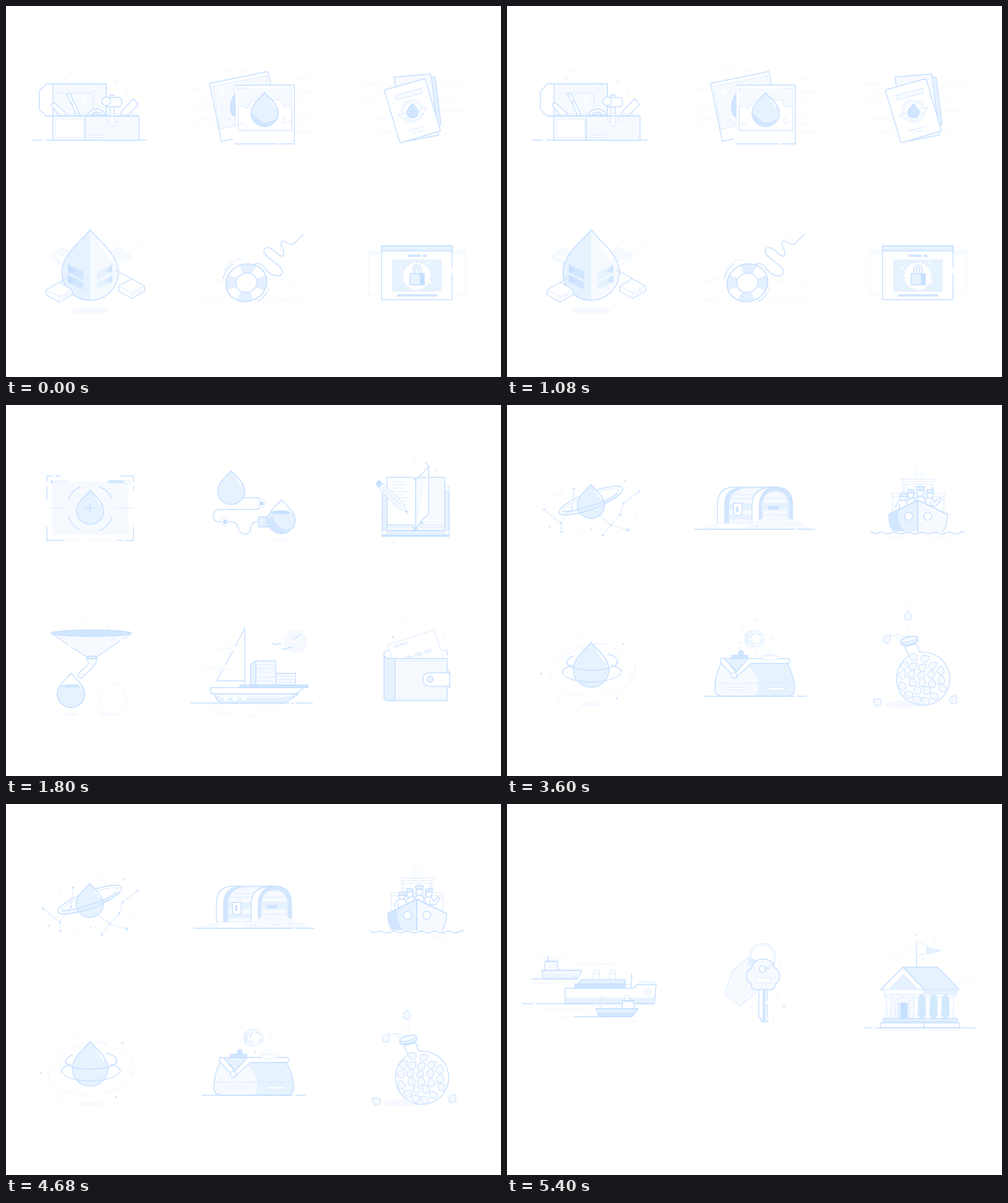
These frames come from a looping animation (800 by 600 pixels, 7.17 s). An HTML page:

```html
<!DOCTYPE html>
<html lang="en">
<head>
<meta charset="utf-8">
<title>Spot illustrations</title>
<style>
html,body{margin:0;width:100%;height:100%;overflow:hidden;background:#fff}
svg{display:block;width:100vw;height:100vh;fill:none;stroke:#c5dfff;stroke-width:1.4;stroke-linejoin:round}
.w{fill:#fff}.p{fill:#f6faff}.m{fill:#e7f2ff}.d{fill:#d2e6ff}.k{fill:#c5dfff}
.n{stroke:none}
.t{stroke:#dcecff;stroke-width:1.1}
.f{stroke:#f0f6ff;stroke-width:1}
.h{stroke:#fff;stroke-width:2;stroke-linecap:round}
.slide{visibility:hidden;animation:7170ms step-end infinite}
#s1{animation-name:a}#s2{animation-name:b}#s3{animation-name:c}#s4{animation-name:e}
@keyframes a{0%{visibility:visible}25.105%,100%{visibility:hidden}}
@keyframes b{0%{visibility:hidden}25.105%{visibility:visible}50.209%,100%{visibility:hidden}}
@keyframes c{0%{visibility:hidden}50.209%{visibility:visible}75.314%,100%{visibility:hidden}}
@keyframes e{0%{visibility:hidden}75.314%,100%{visibility:visible}}
</style>
</head>
<body>
<svg viewBox="0 0 800 600">
<defs>
  <path id="drop" vector-effect="non-scaling-stroke" d="M0 0C6 8 22 19 22 33A22 22 0 0 1-22 33C-22 19-6 8 0 0Z"/>
  <path id="plus" d="M-4 0H4M0-4V4"/>
  <path id="shine" d="M8 12Q14 17 16 23"/>
  <g id="column"><path class="w" d="M-4 312L-3 343H3L4 312Z"/><path class="w" d="M-6 308H6V312H-6ZM-6 343H6V347H-6Z"/></g>
  <clipPath id="left"><path d="M0 0H-30V60H0Z"/></clipPath>
  <clipPath id="low"><path d="M-30 20H30V60H-30Z"/></clipPath>
</defs>

<g class="slide" id="s1">
  <!-- toolbox -->
  <path d="M41 217H58M64 217H228"/>
  <path class="w" d="M65 126H162V178H65L54 167V138Z"/>
  <path class="p" d="M76 126H162V178H76Z"/>
  <path class="t" d="M76 126V178M82 141H141V172M141 141L153 127"/>
  <path class="w" d="M73 160Q76 154 81 159L98 174 93 178H87Z"/>
  <path class="w" d="M98 143Q102 138 105 144L109 154 117 170 120 178H114L106 158 102 151ZM103 157L110 153"/>
  <path class="w" d="M131 177A16 16 0 0 1 161 177Z"/><path class="m" d="M137 177A10 10 0 0 1 155 177Z"/>
  <path class="w" d="M168 144H175V178H168Z"/><path class="w" d="M163 148H183Q187 149 187 155T183 163H163Z"/><circle class="w" cx="162" cy="154" r="7"/>
  <path class="w" d="M185 172L206 150 214 159 196 178H188Z"/>
  <path class="p" d="M76 178H215V217H76Z"/>
  <path class="w" d="M76 178H128V217H76Z"/><path class="t" d="M80 183H126V213H80Z"/>
  <path class="t" d="M135 208H158V213H135ZM76 175H213V178M163 178V188H181V178"/>
  <path class="w t" d="M168 174H175V194H168Z"/><path d="M65 178H215"/>
  <use href="#plus" class="f" x="105" y="106"/><use href="#plus" class="f" x="195" y="139"/><use href="#plus" class="h" x="128" y="151"/>
  <path class="m n" d="M95 116h3v3h-3ZM178 121h3v3h-3Z"/>

  <!-- photos -->
  <path class="f" d="M345 104H368M374 104H396M297 135H322M310 149H328M298 166H331M309 181H336M296 194H318M322 194H340M469 117H494M470 139H504M468 150H488M470 175H496M470 190H490M469 203H503"/>
  <path class="w" d="M366 215L348 219 329 125 423 106 428 128"/>
  <path class="p t" d="M370 194L346 199 334 130 420 113 424 128H370Z"/>
  <path class="d" d="M370 143Q363 152 363 164T370 179Z"/>
  <use href="#plus" class="h" x="350" y="139"/><path class="m n" d="M347 160h3v3h-3ZM359 182h3v3h-3ZM398 121h3v3h-3Z"/>
  <path class="w" d="M370 128H466V223H444M440 223H370Z"/>
  <path class="p n" d="M375 133H462V202H375Z"/>
  <path class="w t" d="M375 201V163Q384 159 390 167Q397 149 408 152 421 140 432 153Q445 147 449 163Q458 160 462 166V201Z"/>
  <path class="t" d="M375 193Q384 187 390 196M451 181Q444 184 450 191 456 185 462 187M375 140V133H390M447 133H462V202H416M411 202H375V169"/>
  <g transform="translate(418 140)"><use href="#drop" class="m"/><path class="d n" d="M-21 33Q-19 53 0 54 13 54 20 41 2 57-15 38Z"/><use href="#shine" class="h"/></g>

  <!-- passports -->
  <path class="f" d="M576 126H607M592 141H611M573 154H607M590 183H621M600 204H628M700 129H743M704 150H728M699 169H742M706 184H728M705 206H718"/>
  <path class="m" d="M680 116L692 115Q694 116 694 118L703 191 690 197Z"/>
  <path class="p" d="M627 115L685 110Q687 110 687 112L699 209 645 219Z"/>
  <path class="w" d="M614 135L675 118Q677 118 678 120L702 202 639 221Q637 221 636 219L612 138Q612 136 614 135Z"/>
  <g transform="translate(657 170) rotate(-15)" class="t">
    <path class="p" d="M-21-32H23V-24H-21ZM-16 29H14M-10 34H7"/>
    <circle r="18"/><circle r="15"/><path class="w" d="M-24 0H-8L-12 8H-17ZM24 0H8L12 8H17Z"/>
  </g>
  <g transform="translate(657 158) scale(.42)"><use href="#drop" class="d"/><use href="#shine" class="h"/></g>

  <!-- storage drop -->
  <path class="p f" d="M72 402L93 390 113 402 93 413ZM72 402V408L93 420 113 408M160 402L181 390 201 402 181 413ZM201 402V408L181 420M171 390L190 379M198 400L224 386"/>
  <ellipse class="p n" cx="136" cy="493" rx="32" ry="6"/>
  <g transform="translate(136 362) scale(2.07)"><use href="#drop" class="p"/><g clip-path="url(#left)"><use href="#drop" class="m"/></g><use href="#shine" class="h"/></g>
  <path class="d n" d="M100 417L125 430V443L100 431ZM100 434L125 447V459L100 447Z"/>
  <path class="k n" d="M100 417L111 430 100 431ZM100 434L111 446 100 447Z"/>
  <path class="m n" d="M172 417L147 430V443L172 431ZM172 434L147 447V459L172 447Z"/>
  <path class="d n" d="M172 417L161 430 172 431ZM172 434L161 446 172 447Z"/>
  <path d="M86 447L99 439M203 441L175 426"/>
  <g id="box"><path class="w" d="M65 459L86 447 107 459V467L86 479 65 467Z"/><path class="t" d="M65 459L86 470 107 459M86 470V479M90 472L103 465"/></g>
  <use href="#box" x="117" y="-6"/>

  <!-- lifebuoy -->
  <path class="f" d="M311 443q5-5 10 0t10 0 10 0 10 0M425 443q5-5 10 0t10 0 10 0 10 0 10 0 10 0M311 475q5-5 10 0t10 0 10 0 10 0M425 476q5-5 10 0t10 0 10 0 10 0 10 0 10 0M452 375L463 366M470 397L482 387"/>
  <g transform="translate(388.500 447.500) rotate(-20) scale(1.04 .94)">
    <circle class="w" r="32"/><circle r="24.500" style="stroke:#e4f0ff;stroke-width:14;stroke-dasharray:19.240"/>
    <path class="t" d="M32 0H16M23 23L11 11M0 32V16M-23 23L-11 11M-32 0H-16M-23-23L-11-11M0-32V-16M23-23L11-11"/>
    <circle r="32"/><circle class="w" r="16.500"/>
  </g>
  <path d="M351 441Q354 426 367 417M421 464Q415 474 406 478"/><path class="t" d="M353 428Q362 411 382 409M425 455Q424 461 421 465"/>
  <path d="M401 418C410 413 416 420 421 427C429 438 446 440 447 430C448 420 419 408 417 398C415 389 425 389 432 395C440 402 448 409 449 401C450 393 441 386 446 381C451 378 457 388 464 385L481 369"/>

  <!-- secure page -->
  <path class="f" d="M586 396H743V468H586Z"/><path class="p n" d="M586 395H607V402H586ZM721 395H743V402H721Z"/>
  <path class="w" d="M721 424V388H607V475H721V432"/><path class="m" d="M607 388H721V396H607Z"/>
  <path class="d n" d="M649 402H670V406H649ZM673 402H680V406H673ZM632 466H697V470H632Z"/>
  <path class="m n" d="M624 410H704V462H624Z"/>
  <circle class="w n" cx="664" cy="437" r="21"/><circle cx="664" cy="437" r="21" style="stroke:#fff;stroke-width:4;stroke-linecap:round;stroke-dasharray:.1 7.230"/>
  <path class="w n" d="M637 422h3v3h-3ZM681 414h3v3h-3ZM683 445h4v4h-4Z"/>
  <path class="w" d="M658 433V425Q658 419 664 419T671 425V433H667V426Q667 423 664 423T662 426V433Z"/>
  <path class="m" d="M653 433H676V451H653Z"/><path class="k n" d="M669 433H676V451H669Z"/>
</g>

<g class="slide" id="s2">
  <!-- viewfinder -->
  <path class="p n" d="M74 123H198V210H74Z"/>
  <path d="M66 125V115H75M80 115H88M66 132V154M66 197V219H95M185 115H206V125M206 132V137M206 197V219H192M189 219H178"/>
  <path class="t" d="M66 167H95M176 167H206"/><path class="m" style="stroke:#e7f2ff;stroke-width:3;stroke-dasharray:1 4" d="M103 218H169"/>
  <circle class="d n" cx="74" cy="124" r="2.500"/><g class="w t"><circle cx="81" cy="124" r="2"/><circle cx="89" cy="124" r="2.500"/><circle cx="97" cy="124" r="2.500"/></g>
  <path class="w t" d="M166 122H200V126H166Z"/><path class="d n" d="M166 122H190V126H166Z"/>
  <path d="M101 152Q107 137 121 132M151 132Q166 138 172 152M172 181Q166 197 151 203M121 203Q107 197 101 181"/>
  <g transform="translate(136 138)"><use href="#drop" class="m"/><use href="#shine" class="h"/></g><path d="M128 167H144M136 159V175"/>

  <!-- transfer -->
  <path d="M383 150H404Q413 150 413 159T404 169H345Q335 169 335 179T345 189H364C374 189 374 197 376 202C380 211 393 211 395 202C397 194 396 189 407 189"/>
  <path class="f" d="M356 177H372"/>
  <g class="w t"><circle cx="413" cy="159" r="6.500"/><circle cx="354" cy="189" r="6.500"/></g><circle class="k n" cx="413" cy="159" r="3.500"/><circle class="k n" cx="354" cy="189" r="3.500"/>
  <g transform="translate(364 106)"><use href="#drop" class="m"/><use href="#shine" class="h"/></g>
  <path class="m" d="M408 181H427V197H408ZM420 181V197M425 181V197"/>
  <g transform="translate(445 153)"><use href="#drop" class="w"/><g clip-path="url(#low)"><use href="#drop" class="m"/></g><ellipse class="k n" cy="20.500" rx="17" ry="3"/><path class="d n" d="M-22 33Q-18 55 0 55 12 54 18 46-6 55-14 24Z"/><use href="#shine" class="h"/></g>
  <ellipse class="p n" cx="444" cy="219" rx="13" ry="3"/>

  <!-- notebook -->
  <path class="m" d="M608 132H716V212H608Z"/><path class="w t" d="M608 203H616V209H608ZM709 203H716V209H709ZM709 132H716V138H709Z"/>
  <path class="p" d="M662 117H709V203H616V194H662Z"/><path class="w" d="M616 117H655Q662 117 662 124V202Q659 194 654 194H616Z"/>
  <path class="t" d="M616 198H654Q660 198 662 203 665 194 673 194H709M668 198H709"/>
  <path class="t" d="M623 124H646M625 129H650M624 134H641M624 140H650M623 145H645M630 150H650M636 156H648M640 161H651"/>
  <path class="w" d="M662 121L682 101Q684 97 677 92M683 98V172Q683 180 677 181L662 199"/>
  <path class="k n" d="M657 203L662 197 667 203ZM608 210H717V213H608ZM668 192L671 187 675 192Z"/>
  <path class="m n" d="M608 136L650 174 646 166 637 168 608 142Z"/>
  <path class="p t" d="M608 126L641 157 650 174 633 166 601 133Z"/><path class="t" d="M604 130L637 161"/><path class="k n" d="M597 127L603 121 609 127 602 134ZM646 170L651 175 645 173Z"/>
  <g class="f"><use href="#plus" x="662" y="87"/><use href="#plus" x="598" y="183"/><use href="#plus" x="728" y="186"/></g><path class="d n" d="M694 105h2v2h-2ZM625 221h2v2h-2Z"/>

  <!-- funnel -->
  <path class="p n" d="M73 369H203L147 407H130Z"/><path d="M73 369L101 388M105 391L130 407M203 369L190 378M185 381L147 407"/><ellipse class="d" cx="138" cy="369" rx="65" ry="5"/>
  <path class="w" d="M130 408Q135 418 132 421L116 435Q116 441 122 442L141 423Q147 417 147 408Z"/><ellipse class="m" cx="138.500" cy="408.500" rx="8" ry="2.500"/><path class="t" d="M119 433L125 439M135 417L141 422"/>
  <g transform="translate(105 434)"><use href="#drop" class="w"/><g clip-path="url(#low)"><use href="#drop" class="m"/></g><ellipse class="d n" cy="20.500" rx="17" ry="3"/><use href="#shine" class="h"/></g>
  <g transform="translate(180 447) rotate(12)"><use href="#drop" class="f w"/></g>
  <ellipse class="p n" cx="104" cy="500" rx="14" ry="3"/><ellipse class="p n" cx="164" cy="500" rx="14" ry="3"/>
  <path class="d n" d="M110 356h2v2h-2ZM163 358h2v2h-2ZM97 378h2v2h-2ZM132 384h2v2h-2ZM154 389h2v2h-2ZM172 378h2v2h-2ZM114 372h2v2h-2ZM147 368h2v2h-2ZM87 465h2v2h-2ZM97 474h2v2h-2ZM108 464h2v2h-2ZM119 469h2v2h-2Z"/>
  <use href="#plus" class="f" x="124" y="347"/>

  <!-- cargo sailboat -->
  <circle class="p n" cx="468" cy="382" r="19.500"/><path d="M429 386q4-1 7 2 4-3 9-1M445 395q4-2 8 0 4-4 10-3M464 380q2-4 5-3 3-5 8-5"/>
  <path class="f" d="M349 389H378M336 394H370M324 424H355M312 428H368M320 490H350M398 490H448M330 497H366M385 503H405"/>
  <path d="M386 361L370 391M367 397L354 421M351 427L341 446H386M386 361V453"/>
  <path class="m" d="M395 419L404 414V453H395Z"/><path class="p" d="M404 414H436V453H404ZM436 434H468V453H436Z"/><path class="t" d="M395 430L404 426H436M395 442L404 440H436M436 444H468M407 420H432M407 432H432M407 446H432M440 439H464M440 449H464"/>
  <path class="m" d="M336 467H473L456 479Q451 482 444 482H350Q342 482 336 467Z"/><path class="w" d="M331 457H482L468 467H331Z"/><path class="p n" d="M340 468H466L445 473H344Z"/>
  <path class="d" d="M378 453H488V457H378Z"/><circle class="w n" cx="355" cy="475" r="3.500"/><circle class="w n" cx="370" cy="475" r="3.500"/><circle class="w n" cx="385" cy="475" r="3.500"/>
  <path d="M298 482H458M461 482H465M468 482H496"/>

  <!-- wallet -->
  <path class="w" d="M620 410H616Q611 409 611 403T617 397H621M707 397H713V405"/>
  <g transform="translate(617 388) rotate(-18)"><rect class="w t" width="79" height="50" rx="3"/><path class="m n" d="M7 4H32V8H7ZM19 27H31V33H19ZM36 27H48V33H36ZM53 27H65V33H53Z"/></g>
  <path class="p" d="M611 404Q612 410 618 410H713V478H617Q611 478 611 472Z"/><path class="m" d="M611 404Q612 410 618 410H629V478H617Q611 478 611 472Z"/><path class="t" d="M633 414H710M633 474H710"/>
  <path class="d n" d="M712 428L718 432V458L712 455Z"/><path class="w" d="M717 433V455H686Q674 455 674 444T686 433Z"/><circle class="m" cx="685.500" cy="443.500" r="5"/>
  <g class="f"><use href="#plus" x="645" y="349"/><use href="#plus" x="708" y="375"/></g><path class="d n" d="M624 374h3v3h-3ZM679 353h2v2h-2Z"/>
</g>

<g class="slide" id="s3">
  <!-- constellation -->
  <path class="t" d="M60 169L87 191 105 166 108 135M87 191L88 205M148 178L168 194 195 202M168 194L155 211M168 194L183 177 188 159 213 140"/>
  <path class="f" d="M73 147L89 145V132M112 193L119 202 108 213M149 112L157 124"/>
  <g transform="translate(135.500 154.500) rotate(-21)"><ellipse class="t" rx="48" ry="9"/><ellipse rx="55" ry="13"/></g>
  <g transform="translate(135.500 128.500)"><use href="#drop" class="m"/><use href="#shine" class="h"/></g>
  <path d="M84 175Q87 181 120 174 157 165 184 143M90 172Q104 173 136 163 164 155 179 143"/>
  <g class="d n"><circle cx="60" cy="169" r="2"/><circle cx="87" cy="191" r="2"/><circle cx="105" cy="166" r="2"/><circle cx="108" cy="135" r="2"/><circle cx="88" cy="205" r="2"/><circle cx="168" cy="194" r="2"/><circle cx="195" cy="202" r="2.500"/><circle cx="155" cy="211" r="2"/><circle cx="183" cy="177" r="2"/><circle cx="188" cy="159" r="2"/><circle cx="213" cy="140" r="2"/><circle cx="69" cy="197" r="1.500"/><circle cx="137" cy="200" r="1.500"/><circle cx="191" cy="122" r="1.500"/></g>
  <g class="f"><use href="#plus" x="120" y="108"/><use href="#plus" x="208" y="177"/></g>

  <!-- chest -->
  <path class="w" d="M340 201V160Q341 133 366 133H437Q461 135 461 160V201Z"/>
  <path class="p n" d="M360 150Q366 136 378 136H414Q398 141 396 158V191H360Z"/>
  <path class="d n" d="M351 191V160Q352 137 371 134H386Q361 138 359 160V191Z"/>
  <path class="t" d="M378 135H417M367 145H402M361 151H398M359 160H396M359 169H396M359 178H396M359 184H396"/><path class="m n" d="M359 161H396V168H359ZM359 179H396V184H359Z"/>
  <path class="m" d="M408 185V160Q409 133 434 133 461 134 461 161V187H408Z"/><path class="d n" d="M408 185V160Q410 136 434 133 458 135 461 160V187H456V161Q455 140 434 138 414 140 412 160V185Z"/>
  <path class="p t" d="M413 159Q415 140 434 140T454 159V183H413Z"/><path class="t" d="M415 151H453M413 159H454M413 170H454M413 178H454"/><path class="m n" d="M413 160H454V169H413Z"/><path class="d" d="M423 164H438V168H423Z"/>
  <path class="w" d="M396 191V160Q397 133 431 133 410 137 408 160V191Z"/>
  <path class="w t" d="M340 191H397V201H340Z"/><path class="w" d="M366 159H380V173Q380 179 373 179T366 173Z"/><circle class="k n" cx="372" cy="166" r="2"/><path class="k n" d="M371 166H373L374 173H370Z"/>
  <path class="p n" d="M313 200Q328 192 342 191V201ZM377 201Q389 190 406 187 430 171 459 185 481 191 494 201Z"/>
  <path class="d n" d="M402 195h3v2h-3ZM424 185h2v2h-2ZM438 194h2v2h-2ZM458 193h2v2h-2Z"/>
  <path d="M303 201H465M469 201H498"/>

  <!-- crew -->
  <path class="f" d="M660 120V108H671V120M654 111H676M660 108V99"/>
  <path class="w t" d="M637 120H691V124H637ZM640 124H688V150H640ZM643 128H685V146H643ZM622 143H707V148H622ZM623 148V175M706 148V172"/>
  <path class="w" d="M628 167Q629 155 637 154H645L651 170M634 160V170M645 159Q648 150 658 150L663 160M658 160Q660 148 668 147 675 148 678 160M674 158Q677 149 684 150 690 152 691 158L698 150 702 152 694 163H686M685 155V166"/>
  <g class="w"><path d="M635 147V151Q637 155 641 154 645 154 646 148ZM648 142V147Q649 151 653 151 657 150 658 142ZM663 138V144Q665 148 668 148 673 147 674 138ZM679 142V147Q681 151 684 151 688 150 689 142Z"/></g>
  <path class="m" d="M635 148Q635 142 641 142T647 148ZM648 142V136L658 138V142ZM661 133L668 131 675 133 673 138H663ZM678 138L689 136V142H678Z"/>
  <path class="m" d="M664 154L617 177Q617 199 627 206H664Z"/><path class="d n" d="M617 177L632 170Q630 195 645 206H627Q617 199 617 177Z"/><path class="p" d="M664 154L712 177Q712 199 702 206H664Z"/><path d="M664 154V206M617 177L664 154 712 177"/>
  <circle class="w" cx="649" cy="180" r="6.500"/><circle class="w" cx="680" cy="180" r="6.500"/>
  <path class="w" d="M588 204q5 6 11 3t11 0 11 0 11 0 11 0 11 0 11 0 11 0 11 0 11 0 11 0 11 0 11 0 9-2"/>
  <path class="f" d="M616 214q6 4 12 0t12 0M680 216q6 4 12 0t12 0 12 0"/>

  <!-- orbit drop -->
  <path class="f" d="M132 470Q69 469 69 437T139 390M157 391Q207 397 207 428 206 459 154 469M86 401Q104 390 130 389"/>
  <path class="t" d="M140 386Q160 385 164 388"/>
  <path d="M108 405Q97 410 96 417M163 403Q183 408 177 419M89 433Q91 424 106 421M168 421Q184 424 185 432"/>
  <g transform="translate(136 384) scale(1.320)"><use href="#drop" class="m"/><use href="#shine" class="h"/></g>
  <path d="M96 416Q99 428 137 429 175 428 180 415M94 438Q104 447 138 448 177 446 184 433M90 433L92 436"/>
  <ellipse class="p n" cx="137" cy="485" rx="18" ry="3.500"/><g class="f"><use href="#plus" x="116" y="375"/><use href="#plus" x="84" y="475"/><use href="#plus" x="201" y="435"/></g><path class="d n" d="M187 385h3v3h-3ZM54 433h3v3h-3ZM176 473h3v3h-3Z"/>

  <!-- purse -->
  <path class="m" d="M346 417Q336 439 336 458 336 471 350 471H452Q465 471 465 458 465 441 453 417Z"/><path class="p n" d="M347 417Q337 439 337 458 337 470 350 470H400Q408 464 406 450 404 433 386 418Z"/>
  <path class="t" d="M337 450H464"/><path class="w t" d="M358 457H384V461H358ZM423 457H449V461H423Z"/>
  <path class="m n" d="M353 411H387L370 434Z"/><path class="d n" d="M361 421H379L370 434Z"/>
  <path class="w" d="M349 410H453Q457 410 457 414T453 418H395L374 437Q371 443 366 439L345 416V410ZM352 411L370 432 389 411"/><path class="m n" d="M358 413H383L371 430Z"/>
  <circle class="w" cx="367" cy="437" r="4.500"/>
  <path class="d" d="M363 405H389V410H363Z"/><circle class="d" cx="378" cy="401" r="4"/><path class="w t" d="M412 405H438V412H412Z"/><circle class="w t" cx="423" cy="401" r="4"/>
  <path class="p t" d="M403 365H393Q384 368 384 378T393 391H403"/><circle class="w t" cx="403" cy="378" r="13"/><circle class="t" cx="403" cy="378" r="9" style="stroke-dasharray:11 3;stroke-width:2"/><path class="t" d="M388 370V386M385 374H390M385 382H390"/>
  <g class="f"><use href="#plus" x="381" y="359"/><use href="#plus" x="429" y="378"/></g><path class="d n" d="M403 346h2v2h-2ZM377 383h2v2h-2ZM402 400h2v2h-2Z"/>
  <path d="M317 471H464M468 471H484"/>

  <!-- flask -->
  <ellipse class="p n" cx="640" cy="484" rx="31" ry="6"/>
  <path class="f" d="M645 333V322M652 333V322M646 370V355M651 370V352"/><path class="t" d="M623 374Q638 367 642 379M629 377Q636 374 639 382"/>
  <path class="w" d="M643 391L650 406A43 43 0 1 0 667 400L662 386Z"/>
  <g id="seeds"></g>
  <g transform="translate(650.500 383) rotate(-14)"><path class="w" d="M-14-4Q0-9 14-4V2Q0 8-14 2Z"/><ellipse class="p" cy="-4" rx="14" ry="4"/><path class="d n" d="M-14 0Q0 5 14 0V2Q0 8-14 2Z"/></g>
</g>

<g class="slide" id="s4">
  <!-- ships -->
  <path class="f" d="M40 249H95Q98 247 102 251 110 250 109 257H130Q137 254 142 262M145 264Q153 255 162 260M174 264Q178 258 169 259H112M40 290H80M56 333H134M88 344H106M165 352H211"/>
  <path class="w" d="M62 255H81L83 269H60Z"/><path d="M61 254H83M66 245V254"/><path class="t" d="M68 260H80V264H68Z"/>
  <path class="p" d="M57 269H121L114 283H57Z"/><path class="t" d="M57 276H104"/><path class="m n" d="M57 279H116L114 283H57Z"/><circle class="w t" cx="109" cy="276" r="3"/><path d="M57 269H121M40 283H114"/>
  <g class="w t"><path d="M140 269H149V284H140ZM140 274H149M166 269H175V284H166ZM166 274H175M183 298Q187 292 194 292H200"/></g>
  <path class="m" d="M120 284H191V291H115Z"/><path class="d" d="M110 291H191V298H110Z"/>
  <path class="w" d="M94 298H204Q208 296 209 292H241L238 323H94Z"/><path class="m n" d="M95 313H238L237 322H95Z"/><path class="t" d="M211 292L217 288H240V292M224 288V292M232 288V292"/>
  <circle class="p t" cx="227" cy="304" r="5.500"/><path d="M201 274V298M25 323H42M48 323H144M158 323H238"/>
  <path class="w" d="M187 319H204L206 331H186Z"/><path class="w t" d="M190 310H198V318H190ZM190 314H198M174 331Q176 325 186 327"/><path d="M186 318H206"/><path class="t" d="M153 309V331M150 320V331"/>
  <path class="m" d="M144 331H212L202 344H148Z"/><path class="d n" d="M146 337H207L202 343H148Z"/><path d="M144 331H212M109 344H202"/>

  <!-- key -->
  <path class="p t" d="M391 247L364 270 352 308 377 327 404 304 412 258ZM364 270L352 308"/><path class="m n" d="M392 247L411 257 402 267 387 259Z"/>
  <circle class="t" cx="413" cy="247" r="21.500"/><circle class="t" cx="413" cy="247" r="18.500"/>
  <path class="w" d="M407 298V346L411 347V352H421V349M421 346V324M421 319V298"/><path class="m n" d="M414 300H418V351H414Z"/><path d="M414 300V352M417 300V352"/>
  <path class="p" d="M400 300Q394 299 395 291C385 288 384 270 396 265C397 246 431 246 432 265C444 270 443 288 433 291Q434 299 428 300Z"/>
  <circle class="w" cx="413.500" cy="267" r="5.500"/><path class="t" d="M413 268.500A21.500 21.500 0 0 0 434 251M413 265.500A18.500 18.500 0 0 0 431 251"/><path class="w t" d="M402 281H426V289H402Z"/>
  <g class="f"><use href="#plus" x="394" y="328"/><use href="#plus" x="436" y="310"/></g><path class="d n" d="M439 259h2v2h-2ZM446 326h3v3h-3ZM429 346h2v2h-2Z"/>

  <!-- bank -->
  <path class="f" d="M592 252H616Q617 241 628 241 636 241 640 249 645 249 646 252M724 289H738Q744 282 750 287L757 289M569 330H591Q596 325 600 331"/>
  <path d="M662 222V264"/><path class="w t" d="M662 223L679 229V242L662 245Z"/><path class="m t" d="M679 232L701 237 679 243Z"/>
  <path class="p n" d="M612 308H668V347H612Z"/><path class="n" style="fill:#d2e9fc" d="M665 308H718V347H665Z"/>
  <path class="m" d="M640 264H696L731 300H674Z"/><path class="w" d="M640 264L604 300H674Z"/><path class="m t" d="M641 276L617 300H664Z"/><path d="M640 264L623 281M619 285L604 300"/>
  <path class="w t" d="M609 300H673V308H609Z"/><path class="m t" d="M673 300H728V308H673Z"/>
  <path class="p t" d="M628 347V317L639 312 650 317V347Z"/><path class="k" d="M632 322H647V347H632Z"/><path class="m n" d="M632 322H636V347H632Z"/>
  <g class="t"><use href="#column" x="617"/><use href="#column" x="661"/><use href="#column" x="680"/><use href="#column" x="699"/><use href="#column" x="718"/></g>
  <path class="m" d="M608 347H728V352H608Z"/><path class="w" d="M604 354H731V362H604Z"/><path d="M674 354V362M577 362H590M595 362H757"/>
  <g class="f"><use href="#plus" x="692" y="221"/><use href="#plus" x="650" y="233"/></g><path class="d n" d="M660 211h2v2h-2ZM671 250h2v2h-2Z"/>
</g>
</svg>
<script>
const seeds = document.getElementById('seeds');
const spots = [656,407, 676,410, 689,421, 672,424, 657,422, 643,421, 639,436, 654,435, 670,437,
  686,435, 701,429, 702,444, 687,450, 671,448, 655,448, 639,454, 663,461, 678,461, 703,457,
  690,470, 676,478, 662,476, 649,468];
function seed(x, y, turn) {
  const use = document.createElementNS('http://www.w3.org/2000/svg', 'use');
  use.setAttribute('href', '#drop');
  use.setAttribute('class', 'p');
  use.setAttribute('style', 'stroke:#d3e7ff');
  use.setAttribute('transform', `translate(${x} ${y}) rotate(${turn}) scale(.270) translate(0 -28)`);
  seeds.append(use);
}
for (let i = 0; i < spots.length; i += 2) seed(spots[i], spots[i + 1], (i * 67) % 140 - 70);
seed(648, 341, 0);
seed(615, 378, 40);
seed(598, 480, -55);
seed(722, 476, 25);
seed(650, 379, 80);
</script>
</body>
</html>
```
